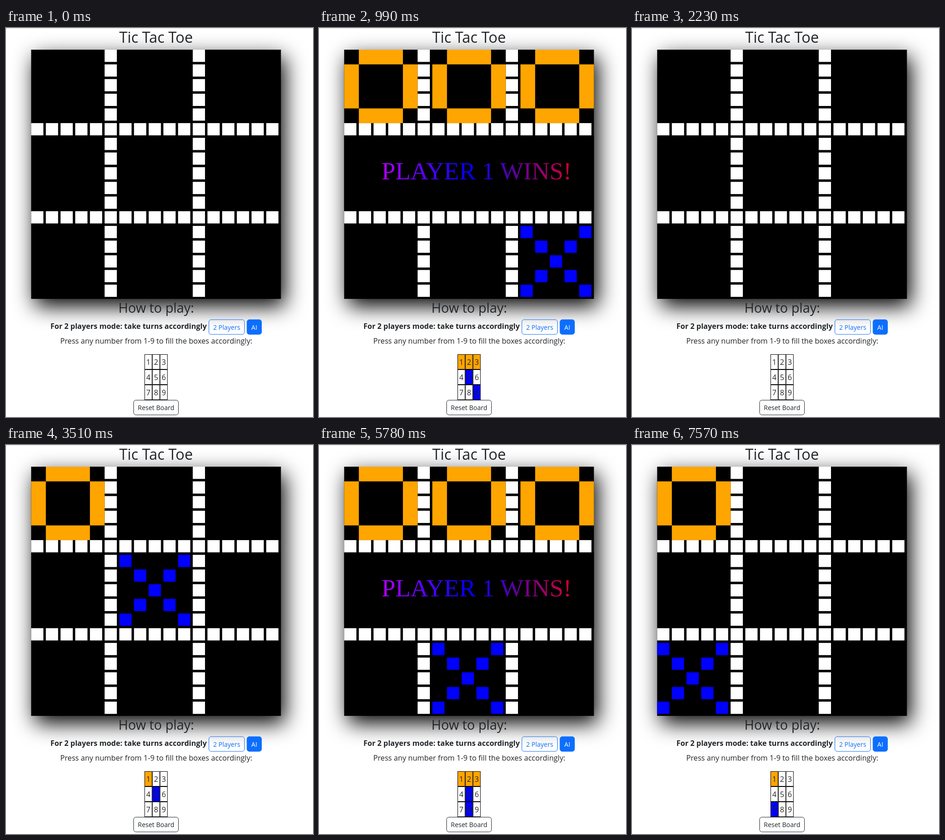
These frames come from a looping animation (665 px wide and 843 px high, 8000 ms). An HTML page:

```html
<!DOCTYPE html>
<html lang="en">
<head>
<meta charset="utf-8">
<title>Tic Tac Toe</title>
<style>
  html, body { margin: 0; width: 100%; height: 100%; overflow: hidden; background: #fff; }
  svg { display: block; width: 665px; height: 843px; font-family: "Open Sans", "Noto Sans", sans-serif; }
  .win { font-family: "Liberation Serif", "Times New Roman", serif; }
</style>
</head>
<body>
<svg id="stage" viewBox="0 0 665 843" xmlns="http://www.w3.org/2000/svg">
  <defs>
    <filter id="blur" x="-20%" y="-20%" width="140%" height="140%">
      <feGaussianBlur stdDeviation="23"/>
    </filter>
    <linearGradient id="rainbow" gradientUnits="userSpaceOnUse" x1="54.5" y1="0" x2="595.5" y2="0">
      <stop offset="0" stop-color="#f0f"/>
      <stop offset=".5" stop-color="#00f"/>
      <stop offset="1" stop-color="#f00"/>
    </linearGradient>
  </defs>
</svg>
<script>
const LOOP = 8000;
const INK = '#212529', BLUE = '#0d6efd';
const LEFT = 54.5, TOP = 47, UNIT = 541 / 17, DOT = 26.5;
const FILL = { O: 'orange', X: 'blue' };

// Start time and board; one character per box, read row by row.
const STATES = [
  [0, '.........'],
  [200, 'O...X....'],
  [660, 'OO..X...X'],
  [990, 'OOO.X...X', true],
  [2230, '.........'],
  [3510, 'O...X....'],
  [5210, 'OO..X..X.'],
  [5780, 'OOO.X..X.', true],
  [6510, '.........'],
  [7570, 'O.....X..']
];

const stage = document.getElementById('stage');

function add(parent, tag, attrs, content) {
  const el = document.createElementNS('http://www.w3.org/2000/svg', tag);
  for (const key in attrs) el.setAttribute(key, attrs[key]);
  if (content) el.textContent = content;
  parent.appendChild(el);
  return el;
}

function rect(parent, x, y, width, height, fill, extra) {
  return add(parent, 'rect', { x, y, width, height, fill, ...extra });
}

function label(content, x, y, size, extra) {
  return add(stage, 'text', {
    x, y, 'font-size': size, fill: INK, 'text-anchor': 'middle', ...extra
  }, content);
}

// Rectangle measured in board units.
function block(parent, col, row, w, h, fill) {
  return rect(parent, LEFT + col * UNIT, TOP + row * UNIT, w * UNIT, h * UNIT, fill);
}

function dot(parent, col, row, fill) {
  return rect(parent, LEFT + col * UNIT, TOP + row * UNIT, DOT, DOT, fill);
}

function drawO(parent, col, row) {
  block(parent, col + 1, row, 3, 1, FILL.O);
  block(parent, col + 1, row + 4, 3, 1, FILL.O);
  block(parent, col, row + 1, 1, 3, FILL.O);
  block(parent, col + 4, row + 1, 1, 3, FILL.O);
}

function drawX(parent, col, row) {
  for (let i = 0; i < 5; i++) {
    dot(parent, col + i, row + i, FILL.X);
    if (i !== 2) dot(parent, col + 4 - i, row + i, FILL.X);
  }
}

function button(x, y, w, content, baseline, color, fill, textColor) {
  rect(stage, x, y, w, 32, fill, { rx: 5, stroke: color });
  label(content, x + w / 2, baseline, 14, { fill: textColor });
}

// Heading and board
rect(stage, 0, 0, 665, 1, '#dcdcdc');
label('Tic Tac Toe', 325, 32, 32.2, { 'font-weight': 500 });
rect(stage, LEFT + 8, TOP + 16, 541, 540, '#000', { filter: 'url(#blur)' });
rect(stage, LEFT, TOP, 541, 540, '#000');

for (let i = 0; i < 17; i++) {
  for (const line of [5, 11]) {
    dot(stage, i, line, '#fff');
    if (i !== 5 && i !== 11) dot(stage, line, i, '#fff');
  }
}

const boxes = [...'123456789'].map((_, i) => {
  const col = i % 3 * 6, row = Math.floor(i / 3) * 6;
  const O = add(stage, 'g', {}), X = add(stage, 'g', {});
  drawO(O, col, row);
  drawX(X, col, row);
  return { O, X };
});

const banner = add(stage, 'g', {});
rect(banner, LEFT, 233.5, 541, 162, '#000');
add(banner, 'text', {
  x: 135.6, y: 328, 'font-size': 53.7, fill: 'url(#rainbow)', class: 'win'
}, 'PLAYER 1 WINS!');

// Instructions
label('How to play:', 325.5, 616.5, 28.4, { 'font-weight': 500 });
label('For 2 players mode: take turns accordingly', 265.5, 652, 16, { 'font-weight': 700 });
button(439.5, 632, 77, '2 Players', 653.5, BLUE, 'none', BLUE);
button(522, 632, 31.5, 'AI', 653.5, BLUE, BLUE, '#fff');
label('Press any number from 1-9 to fill the boxes accordingly:', 325.5, 684, 16.1);

const keys = boxes.map((_, i) => {
  const x = 300 + i % 3 * 16.7, y = 707 + Math.floor(i / 3) * 33;
  const cell = rect(stage, x + .5, y + .5, 15.7, 32, '#fff', { stroke: '#000' });
  label(i + 1, x + 8.35, y + 23, 16);
  return cell;
});
button(276.5, 806.5, 97, 'Reset Board', 828, INK, 'none', INK);

function show(el, on) {
  el.setAttribute('visibility', on ? 'visible' : 'hidden');
}

function render(time) {
  const [, board, won] = STATES.filter(state => state[0] <= time).pop();
  boxes.forEach((box, i) => {
    show(box.O, board[i] === 'O');
    show(box.X, board[i] === 'X');
    keys[i].setAttribute('fill', FILL[board[i]] || '#fff');
  });
  show(banner, won);
}

const start = performance.now();
function tick() {
  render((performance.now() - start) % LOOP);
  requestAnimationFrame(tick);
}
tick();
</script>
</body>
</html>
```
